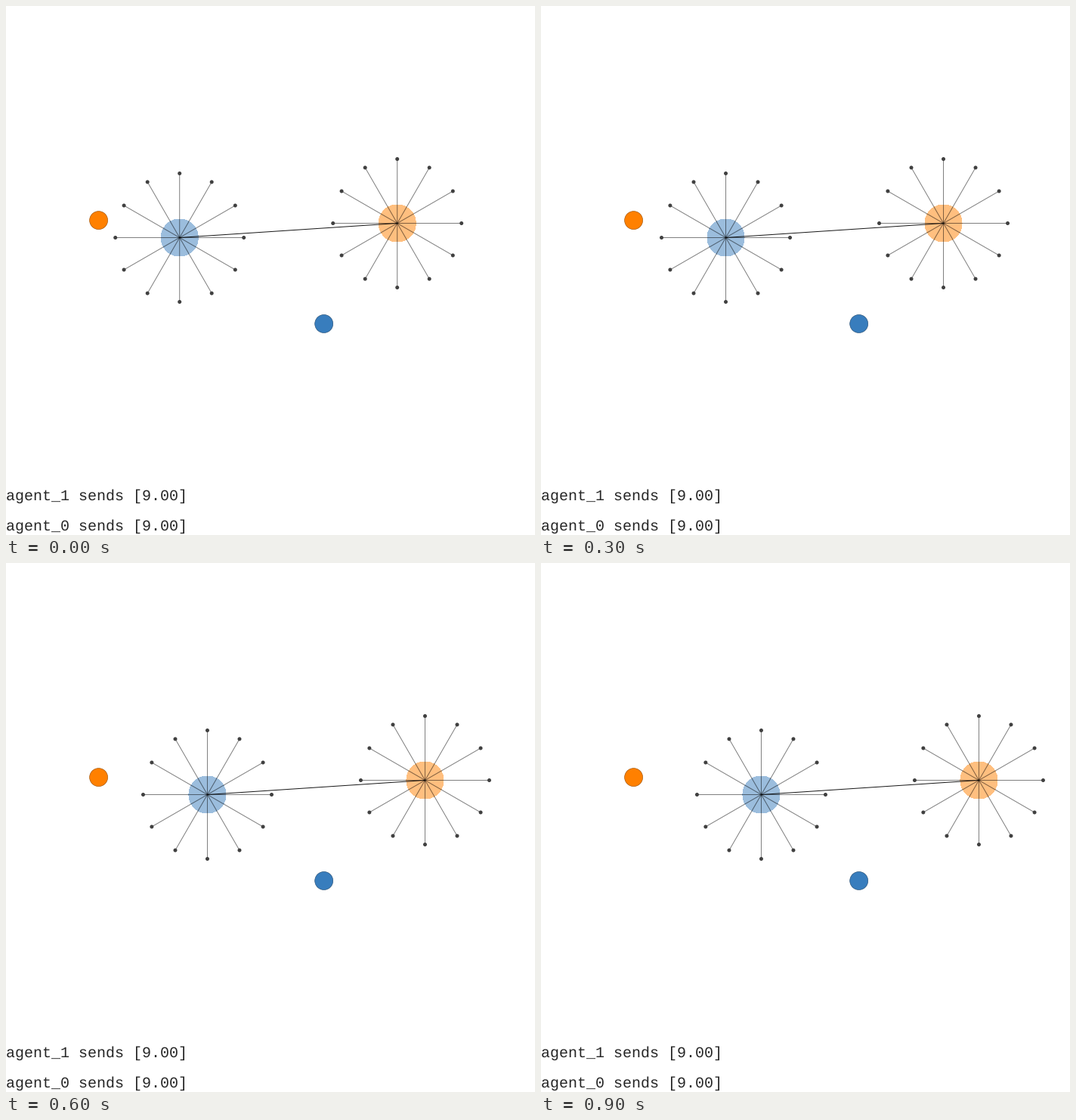
Recreate the animation shown at these times as a matplotlib script. Size 700x700 px, loop 1000 ms.

```python
import numpy as np
import matplotlib.pyplot as plt
from matplotlib.animation import FuncAnimation
from matplotlib.patches import Circle
from matplotlib.transforms import Affine2D

SIZE, DPI = 700, 100
FRAMES, INTERVAL = 10, 100
PX = 72 / DPI  # points per pixel

BLUE = np.array([0.22, 0.49, 0.74])
ORANGE = np.array([1.0, 0.5, 0.0])
RAYS, RAY_LENGTH = 12, 85

# Speed approaches its limit while the gap shrinks by DAMPING each step.
TOP_SPEED, SPEED_GAP, DAMPING = 9.06, 7.13, 0.75

plt.rcParams["text.hinting"] = "none"
plt.rcParams["text.hinting_factor"] = 1

fig = plt.figure(figsize=(SIZE / DPI, SIZE / DPI), dpi=DPI, facecolor="white")
ax = fig.add_axes([0, 0, 1, 1])
ax.set_xlim(0, SIZE)
ax.set_ylim(SIZE, 0)
ax.axis("off")

shift = Affine2D()
moving = shift + ax.transData


def draw_line(start, end, alpha, zorder):
    ax.plot(*zip(start, end), color="black", alpha=alpha, linewidth=PX,
            solid_capstyle="butt", snap=False, transform=moving, zorder=zorder)


def draw_landmark(center, color):
    ax.add_patch(Circle(center, 12, facecolor=color, edgecolor=color * 0.6,
                        linewidth=0.6 * PX, zorder=1))


def draw_agent(center, color):
    ax.add_patch(Circle(center, 24.5, facecolor=color, alpha=0.5, linewidth=0,
                        antialiased=False, transform=moving, zorder=2))


def draw_lidar(center):
    for angle in np.arange(RAYS) * 2 * np.pi / RAYS:
        tip = center + RAY_LENGTH * np.array([np.cos(angle), np.sin(angle)])
        draw_line(center, tip, alpha=0.5, zorder=3)
        ax.add_patch(Circle(tip, 2.5, facecolor="0.25", linewidth=0,
                            transform=moving, zorder=4))


def draw_message(text, baseline):
    ax.text(0, baseline, text, family="Liberation Mono", fontsize=19.8 * PX,
            color="0.15", ha="left", va="baseline")


draw_landmark((122.6, 283.6), ORANGE)
draw_landmark((420.7, 420.5), BLUE)

agents = [(np.array([229.7, 306.5]), BLUE), (np.array([517.7, 287.5]), ORANGE)]
for center, color in agents:
    draw_agent(center, color)
    draw_lidar(center)
draw_line(agents[0][0], agents[1][0], alpha=0.9, zorder=5)

draw_message("agent_1 sends [9.00]", 654)
draw_message("agent_0 sends [9.00]", 694)


def travelled(step):
    lag = SPEED_GAP * DAMPING * (1 - DAMPING ** step) / (1 - DAMPING)
    return TOP_SPEED * step - lag


def update(frame):
    shift.clear().translate(travelled(frame), 0)
    return []


anim = FuncAnimation(fig, update, frames=FRAMES, interval=INTERVAL,
                     init_func=lambda: update(0), repeat=True,
                     repeat_delay=0, blit=False)
plt.show()
```
